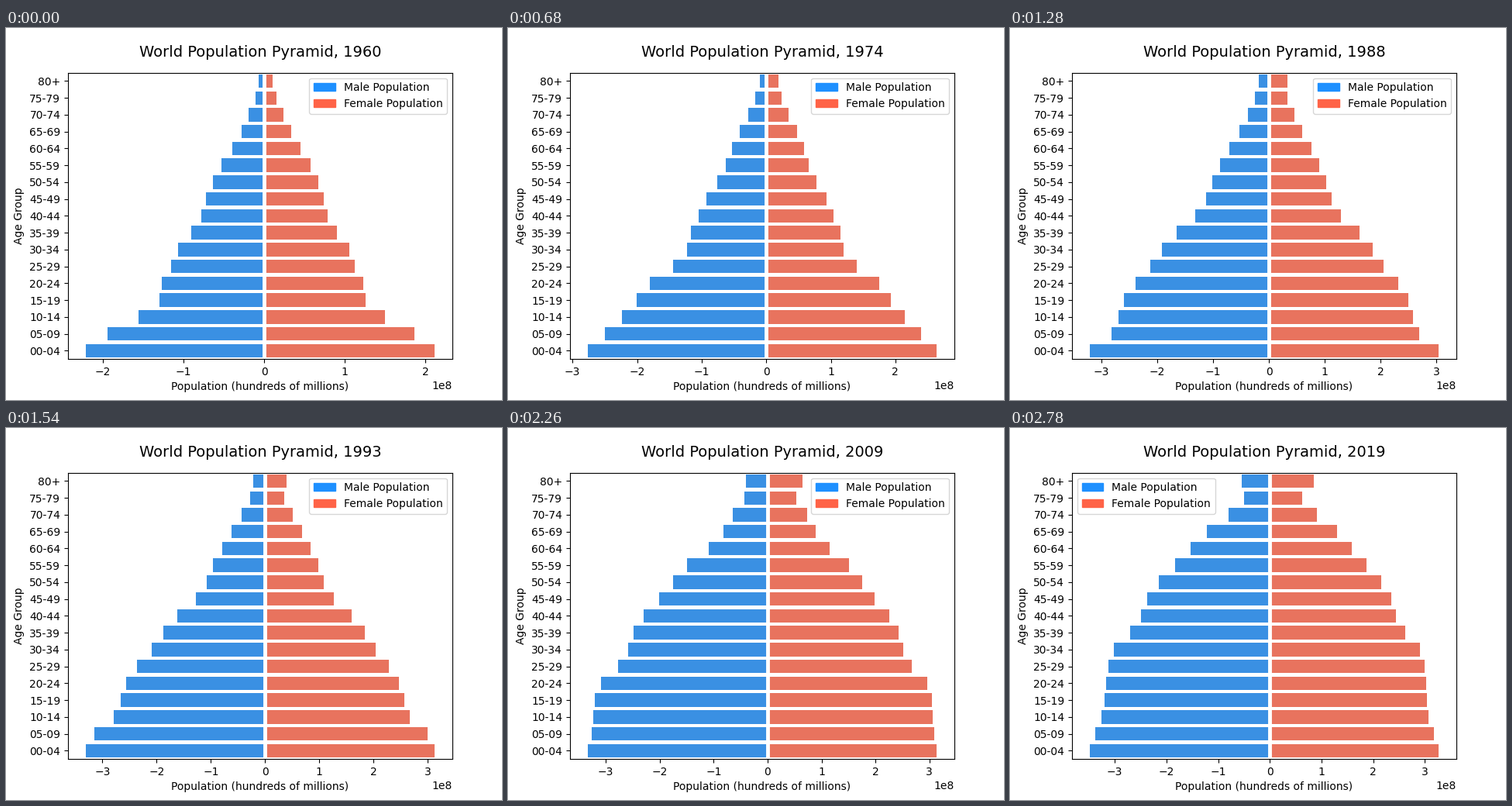
A matplotlib script that plays this animation: 640x480 px, repeating every 2880 ms.

```python
import numpy as np
import matplotlib.pyplot as plt
from matplotlib.animation import FuncAnimation
from matplotlib.patches import Patch

FIRST, LAST = 1960, 2019
TICK = 20  # ms per animation step
GROUPS = [f"{a:02d}-{a + 4:02d}" for a in range(0, 80, 5)] + ["80+"]
AGES = np.arange(len(GROUPS) - 1)  # in five-year steps, without 80+

# Boys per cohort in millions, at the turning points of the birth curve.
BOYS = [(1885, 84), (1900, 133.5), (1905, 142.5), (1910, 133), (1920, 118),
        (1925, 124), (1930, 135), (1935, 138), (1940, 145.6), (1945, 145),
        (1950, 170), (1955, 208.5), (1960, 221.6), (1967, 256.5), (1970, 268),
        (1975, 279), (1980, 278.7), (1983, 287), (1988, 321), (1992, 331.3),
        (2006, 331.3), (2009, 334), (2014, 344.5), (2019, 349)]
GIRLS_PER_BOY = [(1980, 0.955), (1990, 0.946), (2006, 0.946), (2010, 0.938)]


def curve(points, x):
    return np.interp(x, *zip(*points))


def survival(born, female):
    """Share of each cohort alive at AGES: child, lifelong and old-age risk."""
    child = 0.06 * np.clip((1984 - born) / 20, 0.15, 1)
    yearly = np.clip(0.018 * np.exp((1940 - born) / 25), 0.008, 0.08)
    ageing = 0.0009
    if female:
        yearly = 0.9 * yearly - 0.0015
        ageing = 0.00064
    risk = (child * np.minimum(AGES, 1) + yearly * AGES
            + ageing * np.expm1(0.45 * AGES))
    return np.exp(-risk)


def population(year, female=False):
    born = year - 5 * AGES
    size = curve(BOYS, born) * survival(born, female)
    if female:
        size = size * curve(GIRLS_PER_BOY, born)
    growth = (0.0153, 0.37, 10.5) if female else (0.0138, 0, 7)
    return 1e6 * np.append(size, np.polyval(growth, year - FIRST))


fig, ax = plt.subplots(figsize=(6.4, 4.8), dpi=100)
rows = np.arange(len(GROUPS))
left = ax.barh(rows, -population(FIRST), height=0.8, color="#3a90e3")
right = ax.barh(rows, population(FIRST, True), height=0.8, color="#e8735e")
ax.axvline(0, color="white", lw=3.5)
ax.set_yticks(rows, GROUPS)
ax.set_ylim(-0.5, len(GROUPS) - 0.5)
ax.set_xlabel("Population (hundreds of millions)")
ax.set_ylabel("Age Group")
title = ax.set_title("", fontsize=14, pad=15)
ax.legend(handles=[Patch(color="dodgerblue", label="Male Population"),
                   Patch(color="tomato", label="Female Population")],
          loc="best")


def year_at(step):
    """Years last 20, 100 and 20 ms in turn; the last one is held."""
    turn, rest = divmod(step, 7)
    return min(FIRST + 3 * turn + (rest >= 1) + (rest >= 6), LAST)


def draw(step):
    year = year_at(step)
    men, women = population(year), population(year, True)
    for bar, size in zip(left, men):
        bar.set_width(-size)
    for bar, size in zip(right, women):
        bar.set_width(size)
    pad = 0.05 * (men.max() + women.max())
    ax.set_xlim(-men.max() - pad, women.max() + pad)
    title.set_text(f"World Population Pyramid, {year}")
    return [*left, *right, title]


anim = FuncAnimation(fig, draw, frames=144, interval=TICK,
                     init_func=lambda: draw(0), repeat=True, repeat_delay=0)
plt.show()
```
